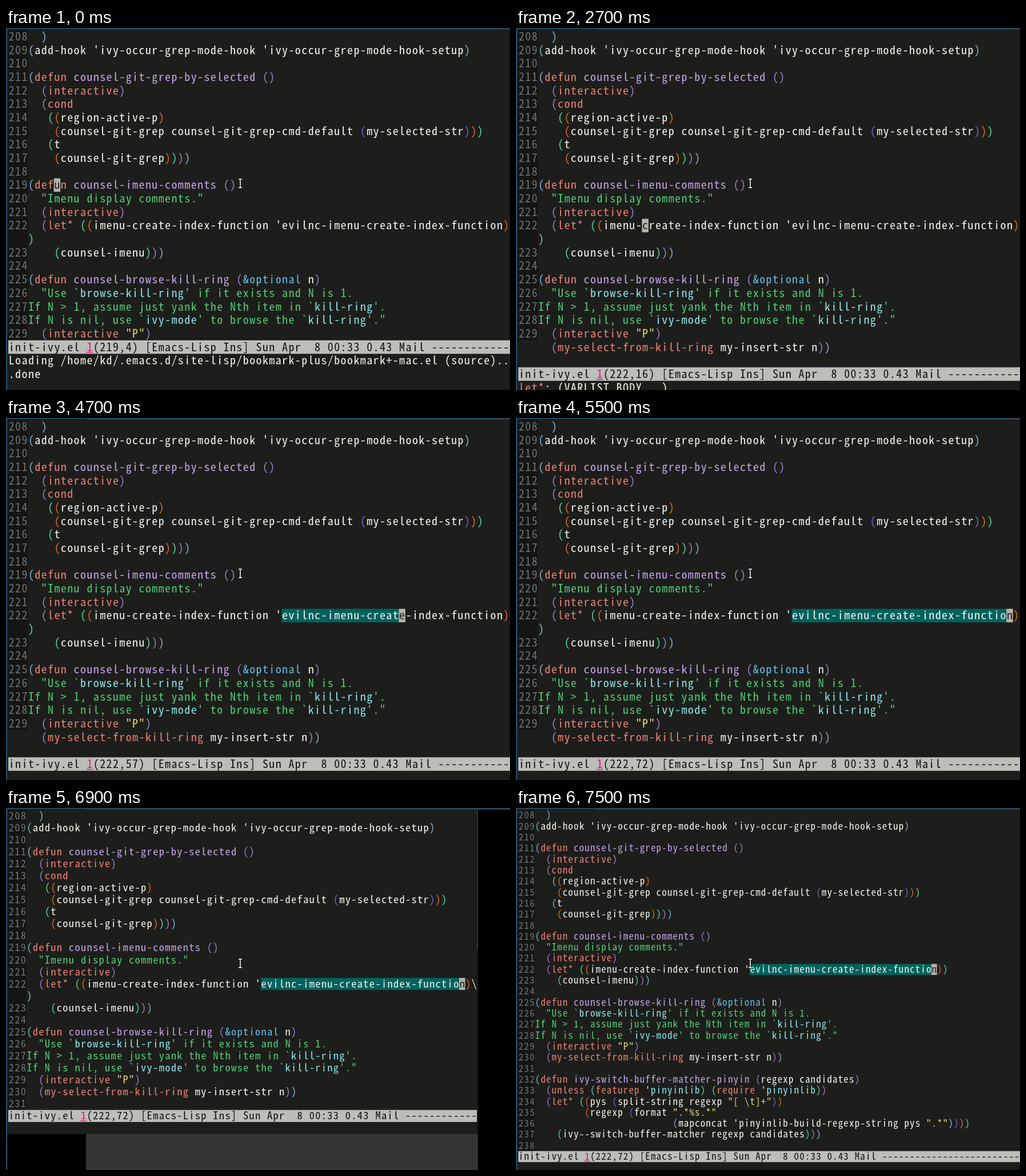
These frames come from a looping animation (882x635 px, 8 s). An HTML page with a canvas:

```html
<!DOCTYPE html>
<html lang="en">
<head>
<meta charset="utf-8">
<title>Emacs session</title>
<style>
html, body { margin: 0; width: 100%; height: 100%; overflow: hidden; background: #000; }
canvas { display: block; }
</style>
</head>
<body>
<canvas id="stage" width="882" height="635"></canvas>
<script type="text/plain" id="code">
  )
(add-hook 'ivy-occur-grep-mode-hook 'ivy-occur-grep-mode-hook-setup)

(defun counsel-git-grep-by-selected ()
  (interactive)
  (cond
   ((region-active-p)
    (counsel-git-grep counsel-git-grep-cmd-default (my-selected-str)))
   (t
    (counsel-git-grep))))

(defun counsel-imenu-comments ()
  "Imenu display comments."
  (interactive)
  (let* ((imenu-create-index-function 'evilnc-imenu-create-index-function))
    (counsel-imenu)))

(defun counsel-browse-kill-ring (&optional n)
  "Use `browse-kill-ring' if it exists and N is 1.
If N > 1, assume just yank the Nth item in `kill-ring'.
If N is nil, use `ivy-mode' to browse the `kill-ring'."
  (interactive "P")
  (my-select-from-kill-ring my-insert-str n))

(defun ivy-switch-buffer-matcher-pinyin (regexp candidates)
  (unless (featurep 'pinyinlib) (require 'pinyinlib))
  (let* ((pys (split-string regexp "[ \t]+"))
         (regexp (format ".*%s.*"
                         (mapconcat 'pinyinlib-build-regexp-string pys ".*"))))
    (ivy--switch-buffer-matcher regexp candidates)))

</script>
<script>
const W = 882, H = 635, LOOP = 8000;
const LEFT = 4, TOP = 3.2, GUTTER = 3, FIRST = 208, WRAP = 74, MARK = 39;
const FONT = '"Noto Sans Mono CJK JP", "Noto Sans Mono CJK SC", "Noto Sans Mono", monospace';
const color = {
  bg: '#1d1e1b', gutter: '#151614', number: '#707274', text: '#f6f6f0',
  keyword: '#ec8078', name: '#c6a5ee', doc: '#50ce78', string: '#e8d873',
  constant: '#8ce8ee', option: '#62bdec', region: '#00625e',
  cursor: '#b4b4ad', bar: '#bdbdb9', count: '#ec1080', frame: '#28506e', behind: '#343434'
};
const parens = ['#7fb0d4', '#a07ad2', '#58d49c', '#d9692c', '#7460c8', '#7fb0d4'];
const keywords = new Set(['defun', 'interactive', 'cond', 'let*', 'unless', 'featurep',
  'require', 'my-select-from-kill-ring']);

const lines = document.getElementById('code').textContent.split('\n').slice(1, -1);
const ctx = document.getElementById('stage').getContext('2d');

// Each line becomes a list of [column, text, colour].
let depth = 1, stringColor = null, quoted = false, previous = '';
const tokens = lines.map(line => {
  if (line[0] === '(') depth = 0;
  return [...line.matchAll(/["`'()]|\s+|[^\s()"`']+/g)].map(match => {
    const text = match[0], col = match.index;
    let paint = color.text;
    if (text === '"') {
      const opening = line.slice(0, col).trim() ? color.string : color.doc;
      paint = stringColor || opening;
      stringColor = stringColor ? null : opening;
    } else if (stringColor) {
      if (text === '`') quoted = true;
      if (text === "'") quoted = false;
      paint = quoted && text !== '`' ? color.constant : stringColor;
    } else if (text === '(') {
      paint = parens[depth++];
    } else if (text === ')') {
      paint = parens[--depth];
    } else if (keywords.has(text)) {
      paint = color.keyword;
    } else if (previous === 'defun') {
      paint = color.name;
    } else if (text[0] === '&') {
      paint = color.option;
    } else if (text === 'pinyinlib') {
      paint = color.constant;
    }
    if (text.trim()) previous = text;
    return [col, text, paint];
  });
});

// Timelines: [start, value...]
const cursorMoves = [
  [0, 219, 4], [100, 220, 4], [1100, 221, 4], [1500, 222, 4], [1700, 222, 6], [1900, 222, 9],
  [2700, 222, 16], [2800, 222, 23], [2900, 222, 29], [3100, 222, 38], [3300, 222, 39],
  [3900, 222, 44], [4100, 222, 45], [4300, 222, 50], [4500, 222, 51], [4700, 222, 57],
  [4900, 222, 58], [5100, 222, 63], [5300, 222, 64], [5500, 222, 72]
];
const messages = [
  [0, '', 'Loading /home/kd/.emacs.d/site-lisp/bookmark-plus/bookmark+-mac.el (source)..', '.done'],
  [700, '', ''],
  [1300, 'interactive', ': (&optional ARG-DESCRIPTOR)'],
  [1500, '', ''],
  [1700, 'let*', ': (VARLIST BODY...)'],
  [3300, '', ''],
  [3700, '', '-- VISUAL --'],
  [3900, '', '']
];
// cell width, row height, status row, last numbered line, wrapped, window right, window bottom
const layouts = [
  [0, 11.39, 23.68, 23, 229, true, W, H],
  [700, 11.39, 23.68, 25, 229, true, W, H],
  [6500, 11.39, 23.68, 25, 231, true, W, H],
  [6900, 10.52, 21.06, 25, 231, true, 826, 572],
  [7000, 10.52, 21.06, 28, 231, false, W, H],
  [7100, 10.52, 21.06, 28, 238, false, W, H],
  [7500, 9.64, 19.31, 31, 238, false, W, H]
];
const at = (list, time) => list.filter(item => item[0] <= time).pop().slice(1);

function rect(x, y, w, h, paint) {
  ctx.fillStyle = paint;
  ctx.fillRect(x, y, w, h);
}

// Sets the font with each glyph centred in its cell; returns the left bearing.
function setFont(cell) {
  ctx.letterSpacing = '0px';
  ctx.font = `${cell * 1.75}px ${FONT}`;
  const gap = cell - ctx.measureText('0'.repeat(20)).width / 20;
  ctx.letterSpacing = `${gap}px`;
  return gap / 2;
}

function drawPointer() {
  const stem = new Path2D('M407 265 H409.3 L410 265.7 L410.7 265 H413 M410 266 V279 M407 280 H409.3 L410 279.3 L410.7 280 H413');
  for (const [width, paint] of [[3.4, '#111'], [1.5, '#fff']]) {
    ctx.lineWidth = width;
    ctx.strokeStyle = paint;
    ctx.stroke(stem);
  }
}

function draw(time) {
  const [cell, rowHeight, statusRow, lastNumber, wrapped, right, bottom] = at(layouts, time);
  const [cursorLine, cursorCol] = at(cursorMoves, time);
  const [head, message, more] = at(messages, time);
  const blinkOff = time >= 6000 && time < 6100;
  const barRight = right < W ? right - 2 : W;
  const bearing = setFont(cell);
  const x = col => LEFT + col * cell;
  const y = row => TOP + row * rowHeight;
  const write = (text, col, row, paint) => {
    ctx.fillStyle = paint;
    ctx.fillText(text, x(col) + bearing, y(row) + rowHeight * 0.79);
  };
  const block = (col, row, count, paint) => rect(x(col), y(row), cell * count, rowHeight, paint);

  rect(0, 0, W, H, '#000');
  rect(140, 2, 686, H, color.behind);
  rect(0, 0, right, bottom, color.bg);
  rect(140, 1, W - 140, 2, color.behind);
  rect(0, 0, W, 1.5, color.frame);
  rect(0, 0, 2, H, color.frame);
  if (right < W) rect(barRight, 2, 2, 246, color.behind);

  let row = 0;
  for (let i = 0; i < lines.length && row < statusRow; i++, row++) {
    const number = FIRST + i, folds = wrapped && lines[i].length > WRAP;
    if (number <= lastNumber) {
      block(0, row, GUTTER, color.gutter);
      if (folds) block(0, row + 1, GUTTER, color.gutter);
      write(number, 0, row, color.number);
    }
    const active = number === cursorLine;
    if (active && time >= 3400) {
      block(GUTTER + MARK, row, cursorCol - MARK + blinkOff, color.region);
    }
    for (const [col, text, paint] of tokens[i]) {
      const over = wrapped && col >= WRAP;
      write(text, GUTTER + col - (over ? WRAP : 0), row + over, paint);
    }
    if (active && !blinkOff) {
      block(GUTTER + cursorCol, row, 1, color.cursor);
      write(lines[i][cursorCol], GUTTER + cursorCol, row, color.bg);
    }
    if (folds) {
      write('\\', GUTTER + WRAP, row, color.text);
      row++;
    }
  }

  rect(LEFT, y(statusRow), barRight - LEFT, rowHeight, color.bar);
  const status = `(${cursorLine},${cursorCol}) [Emacs-Lisp Ins] Sun Apr  8 00:33 0.43 Mail `;
  const dashes = Math.ceil((barRight - x(13 + status.length)) / cell);
  write('init-ivy.el', 0, statusRow, '#111');
  write('1', 12, statusRow, color.count);
  rect(x(12), y(statusRow) + rowHeight * 0.87, cell, 1.3, color.count);
  ctx.save();
  ctx.beginPath();
  ctx.rect(0, 0, barRight, H);
  ctx.clip();
  write(status + '-'.repeat(dashes), 13, statusRow, '#111');
  ctx.restore();

  write(head, 0, statusRow + 1, color.keyword);
  write(message, head.length, statusRow + 1, color.text);
  if (more) write(more, 0, statusRow + 2, color.text);
  drawPointer();
}

function tick() {
  draw(performance.now() % LOOP);
  requestAnimationFrame(tick);
}
tick();
</script>
</body>
</html>
```
